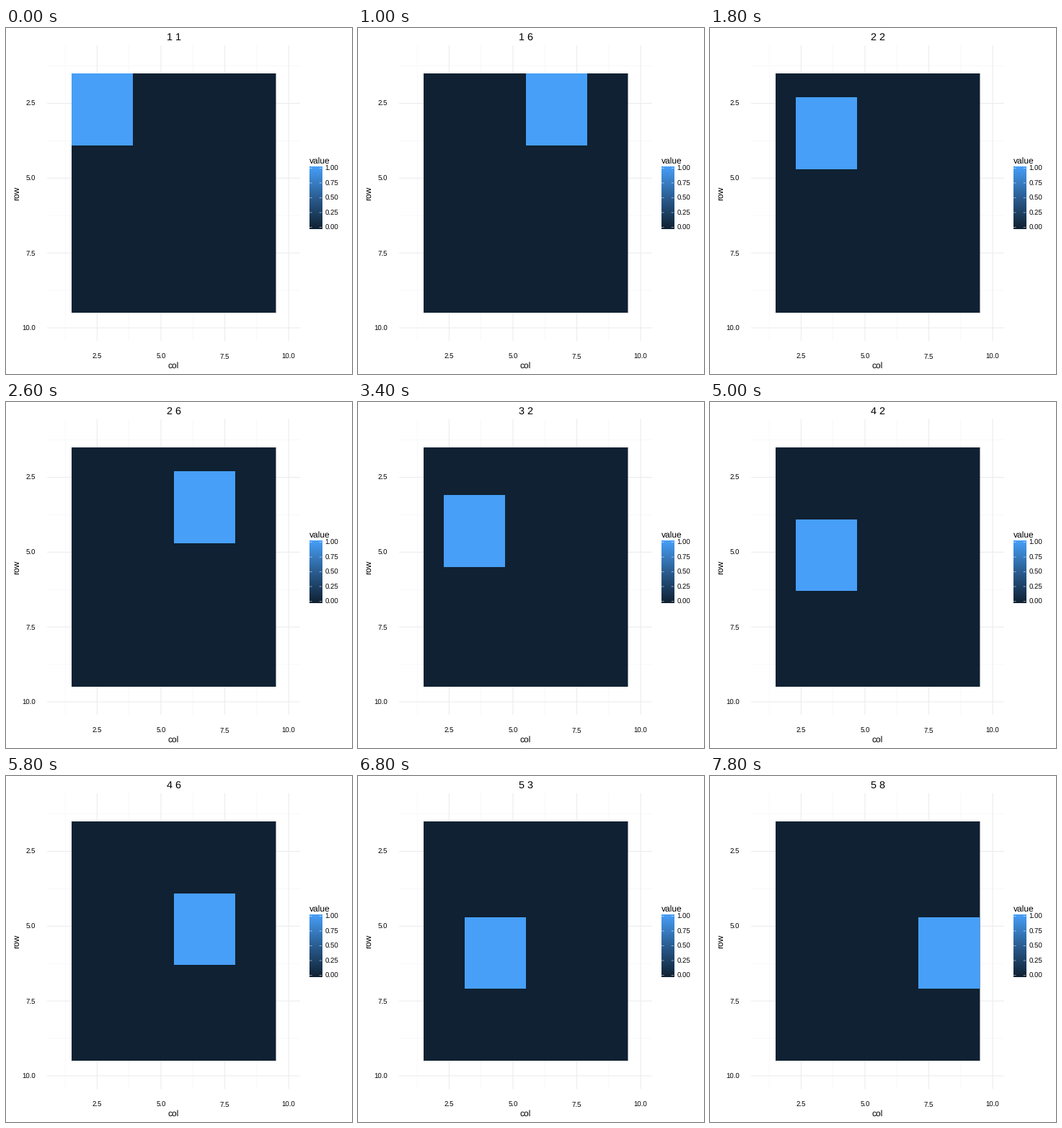
A matplotlib script for the animation above (8000 ms loop, 480 px wide and 480 px high).

```python
import matplotlib.pyplot as plt
import numpy as np
from matplotlib.animation import FuncAnimation
from matplotlib.colors import LinearSegmentedColormap
from matplotlib.patches import Rectangle

SIZE, DPI = 480, 100
PX = 72 / DPI  # points per pixel
POSITIONS, ROWS, WINDOW = 8, 5, 3
DARK, LIGHT = "#0f2132", "#479ff8"

plt.rcParams.update({"font.family": "Liberation Sans", "text.hinting": "none"})
fig = plt.figure(figsize=(SIZE / DPI, SIZE / DPI), dpi=DPI, facecolor="white")
ax = fig.add_axes([0, 0, 1, 1])
ax.set_xlim(0, SIZE)
ax.set_ylim(SIZE, 0)
ax.axis("off")


def col_x(v):
    return 126.4 + (v - 2.5) * 35.43


def row_y(v):
    return 104.5 + (v - 2.5) * 41.53


def line(xs, ys, color, width, z=1):
    ax.plot(xs, ys, color=color, lw=width * PX, zorder=z,
            solid_capstyle="butt", snap=False)


def label(x, y, text, size, ha="center", **kw):
    return ax.text(x, y, text, size=size * PX, ha=ha, va="baseline",
                   color="black", **kw)


def box(x0, y0, x1, y1, color, z):
    patch = Rectangle((x0, y0), x1 - x0, y1 - y0, fc=color, lw=0,
                      zorder=z, snap=False)
    return ax.add_patch(patch)


# Grid and axis labels
for k in range(4):
    major = 2.5 * (k + 1)
    for v, color, width in ((major - 1.25, "#f3f3f3", 0.5),
                            (major, "#ebebeb", 1)):
        line([col_x(v)] * 2, [24, 434], color, width)
        line([57, 408], [row_y(v)] * 2, color, width)
    label(col_x(major), 459, f"{major:.1f}", 9.6)
    label(41, row_y(major) + 3.5, f"{major:.1f}", 9.6, "right")

label(232.5, 472, "col", 12)
label(18, 229, "row", 12, rotation=90, rotation_mode="anchor")
title = label(232.7, 17, "", 14.4)

# Raster of 10 by 10 cells and the moving window
x_edges = np.round(np.linspace(91, 374.5, 11)[:-1]).tolist() + [374.5]
y_edges = np.round(np.linspace(63, 395, 11)).tolist()
box(x_edges[0], y_edges[0], x_edges[-1], y_edges[-1], DARK, 2)
window = box(0, 0, 1, 1, LIGHT, 3)

# Colour bar
cmap = LinearSegmentedColormap.from_list("blues", [DARK, "#2a5d91", LIGHT])
left, top, right, bottom = 421, 192.4, 438.2, 278.7
ax.imshow(np.linspace(1, 0, 256)[:, None], cmap=cmap, aspect="auto",
          extent=(left, right, bottom, top), interpolation="bilinear",
          zorder=2)
ax.set_xlim(0, SIZE)
ax.set_ylim(SIZE, 0)
label(420.6, 188, "value", 12, "left")
for k in range(5):
    y = 276.5 - 20.5 * k
    line([left, left + 3.5], [y, y], "white", 0.5, 3)
    line([right - 3.5, right], [y, y], "white", 0.5, 3)
    label(442.6, y + 3.5, f"{k / 4:.2f}", 9.6, "left")


def update(i):
    r, c = divmod(i, POSITIONS)
    x0, x1 = x_edges[c], x_edges[c + WINDOW]
    y0, y1 = y_edges[r], y_edges[r + WINDOW]
    window.set_bounds(x0, y0, x1 - x0, y1 - y0)
    title.set_text(f"{r + 1} {c + 1}")
    return window, title


anim = FuncAnimation(fig, update, frames=POSITIONS * ROWS, interval=200,
                     repeat=True, repeat_delay=0, blit=False)
plt.show()
```
